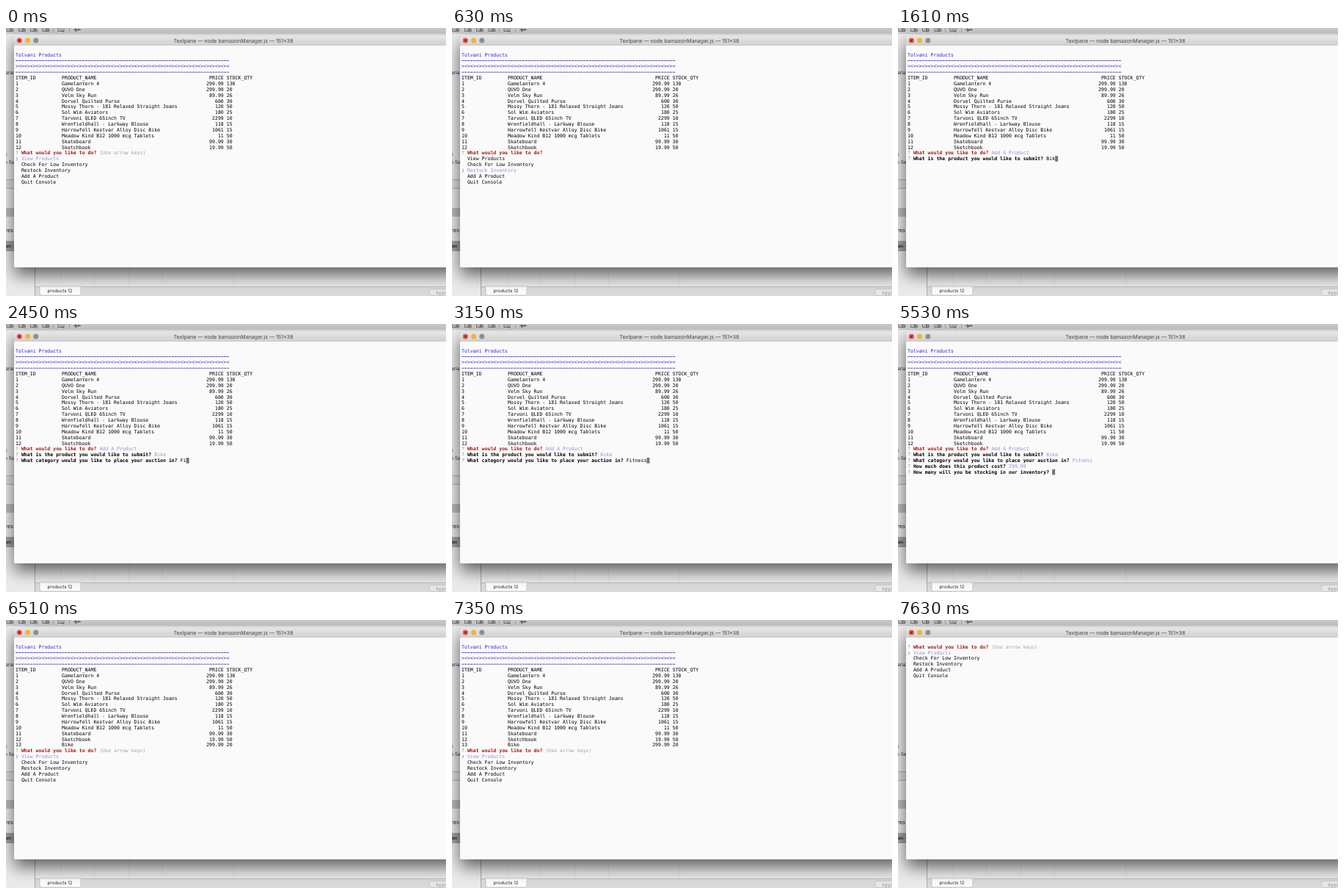
These frames come from a looping animation (600x365 px, 7.7 s). An HTML page:

```html
<!DOCTYPE html>
<html lang="en">
<head>
<meta charset="utf-8">
<title>Inventory console</title>
<style>
  html, body { margin: 0; width: 100%; height: 100%; overflow: hidden; background: #e6e6e6; }
  svg { display: block; width: 100vw; height: 100vh; }
  text { white-space: pre; text-rendering: geometricPrecision; }
  .ui { font-family: Inter, "Open Sans", sans-serif; font-size: 6.6px; fill: #222; }
  .ui .big { font-size: 7.5px; }
  .ui .tab { font-size: 6.2px; }
  .ui .off { fill: #999; }
  .ui .bold { font-size: 6px; font-weight: 700; }
  .title { font-size: 7.1px; fill: #444; }
  #screen { font-family: "DejaVu Sans Mono", "Liberation Mono", monospace; font-size: 6.55px; }
</style>
</head>
<body>
<svg viewBox="0 0 600 365" xmlns="http://www.w3.org/2000/svg">
  <defs>
    <linearGradient id="bar" x2="0" y2="1">
      <stop offset="0" stop-color="#e6e6e6"/><stop offset="1" stop-color="#d0d0d0"/>
    </linearGradient>
    <filter id="blur" x="-20%" y="-20%" width="140%" height="140%">
      <feGaussianBlur stdDeviation="11"/>
    </filter>
  </defs>

  <!-- application behind the window -->
  <rect width="600" height="365" fill="#eaeaea"/>
  <rect width="600" height="8" fill="#cacaca"/>
  <g id="tools" fill="none" stroke="#555" stroke-width=".8"></g>
  <rect y="207" width="11" height="11" fill="#dedede"/>
  <path d="M0 206.5H11M0 218.5H11" stroke="#b4b4b4"/>
  <rect y="245" width="11" height="12" fill="#bcbcbc"/>
  <rect y="290" width="11" height="14" fill="#a2a2a2"/>
  <path d="M75.5 326V350M120.5 326V350M167.5 326V350M213.5 326V350M310.5 326V350" stroke="#d6d6d6" stroke-width=".6"/>
  <rect x="40" y="352" width="560" height="13" fill="#dadada"/>
  <path d="M39.5 320V365" stroke="#a8a8a8"/>
  <path d="M40 352.5H600" stroke="#b4b4b4" stroke-width=".8"/>
  <path d="M45 352H103Q102 353 102 356V361Q102 364 99 364H49Q46 364 46 361V356Q46 353 45 352Z" fill="#fbfbfb" stroke="#b0b0b0" stroke-width=".6"/>
  <rect x="577.5" y="355.5" width="40" height="9" rx="2" fill="#e8e8e8" stroke="#bbb" stroke-width=".7"/>
  <rect x="11" y="21" width="616" height="315" opacity=".6" filter="url(#blur)"/>
  <g class="ui">
    <text x="-1" y="62.5">aria</text>
    <text x="-2" y="174">s</text>
    <text x="-2" y="185">n Se</text>
    <text class="big" x="-1" y="277.5">res</text>
    <text class="bold" x="-2" y="299.3">ion</text>
    <text class="tab" x="56.5" y="360.2">products 12</text>
    <text class="off" x="586" y="362.5">Apply</text>
  </g>

  <!-- window -->
  <path d="M11 325V14.5Q11 10.5 15 10.5H607V326H12Z" fill="#fafafa"/>
  <path d="M11 23.5V14.5Q11 10.5 15 10.5H607V23.5Z" fill="url(#bar)"/>
  <path d="M11 23.5H600" stroke="#bcbcbc" stroke-width=".6"/>
  <circle cx="18.3" cy="17" r="3.5" fill="#ee4f49"/>
  <path d="M16.8 15.5L19.8 18.5M19.8 15.5L16.8 18.5" stroke="#5c0a08" stroke-width=".9"/>
  <circle cx="29.6" cy="17" r="3.5" fill="#f2b632"/>
  <circle cx="40.8" cy="17" r="3.5" fill="#8f8f8f"/>
  <g class="ui">
    <text class="title" x="310" y="19.5" text-anchor="middle">Textpane — node bamazonManager.js — 151×38</text>
  </g>
  <g id="screen"></g>
</svg>
<script>
const LOOP = 7700, KEY = 140;
const X0 = 13, Y0 = 38.7, COL = 3.945, ROW = 7.865;
const INK = "#000", BLUE = "#2c22d4", RED = "#a01a1a", HINT = "#a0a0a0", PICK = "#958dda", MARK = "#7f8f7f";
const MENU = ["View Products", "Check For Low Inventory", "Restock Inventory", "Add A Product", "Quit Console"];
const GOODS = [
  ["Gamelantern 4", "299.99", 130],
  ["QUVO One", "299.99", 20],
  ["Velm Sky Run", "89.99", 26],
  ["Dorvel Quilted Purse", "600", 30],
  ["Mossy Thorn - 181 Relaxed Straight Jeans", "120", 50],
  ["Sol Wim Aviators", "180", 25],
  ["Tarvoni QLED 65inch TV", "2299", 10],
  ["Wrenfieldhall - Larkway Blouse", "118", 15],
  ["Harrowfell Kestvar Alloy Disc Bike", "1061", 15],
  ["Meadow Kind B12 1000 mcg Tablets", "11", 50],
  ["Skateboard", "99.99", 30],
  ["Sketchbook", "19.99", 50],
  ["Bike", "299.99", 20]
];
// ask: question appears, type: first key, done: answer is sent
const STEPS = [
  { ask: 1050, type: 1320, done: 2030, q: "What is the product you would like to submit?", a: "Bike" },
  { ask: 2030, type: 2240, done: 3430, q: "What category would you like to place your auction in?", a: "Fitness" },
  { ask: 3430, type: 4040, done: 5110, q: "How much does this product cost?", a: "299.99" },
  { ask: 5110, type: 5740, done: 6300, q: "How many will you be stocking in our inventory?", a: "20" }
];
const ADDED = 6300, CLEARED = 7625;
const BOLD = 'font-weight="700"';
const screen = document.getElementById("screen");

const colX = col => X0 + col * COL;
const rowY = row => Y0 + row * ROW;

function print(row, ...parts) {
  let col = 0, out = "";
  for (const [str, fill = INK, extra = ""] of parts) {
    const safe = str.replace(/</g, "&lt;").replace(/>/g, "&gt;");
    out += `<text x="${colX(col)}" y="${rowY(row)}" fill="${fill}" ${extra}>${safe}</text>`;
    col += str.length;
  }
  return out;
}

// a row of hyphens that almost touch
const rule = row =>
  `<path d="M${colX(0)} ${rowY(row) - 2.1}H${colX(74)}" stroke="${BLUE}" stroke-width=".8" stroke-dasharray="3.3 ${COL - 3.3}"/>`;

const tableRow = (row, id, name, price, qty) =>
  print(row, [String(id).padEnd(16) + name.padEnd(56 - price.length) + price + " " + qty]);

function table(count) {
  let out = print(0, ["Tolvani Products", BLUE]) + rule(1) +
    print(2, ["><".repeat(37), BLUE]) + rule(3) +
    tableRow(4, "ITEM_ID", "PRODUCT_NAME", "PRICE", "STOCK_QTY");
  GOODS.slice(0, count).forEach((g, i) => out += tableRow(5 + i, i + 1, ...g));
  return out;
}

const prompt = (row, q, color, answer, tint) =>
  print(row, ["? ", MARK], [q, color, BOLD], [" " + answer, tint]);

const doWhat = (row, answer, tint) => prompt(row, "What would you like to do?", RED, answer, tint);

function menu(row, picked) {
  let out = doWhat(row, picked ? "" : "(Use arrow keys)", HINT);
  MENU.forEach((item, i) => {
    const on = i === picked;
    out += print(row + 1 + i, [on ? "❯ " : "  ", PICK], [item, on ? PICK : INK]);
  });
  return out;
}

const cursor = (row, col) =>
  `<rect x="${colX(col)}" y="${rowY(row) - 6}" width="${COL}" height="7.6" fill="#777"/>`;

function form(t) {
  let out = doWhat(17, MENU[3], PICK);
  STEPS.forEach((s, i) => {
    if (t < s.ask) return;
    const row = 18 + i, sent = t >= s.done;
    const keys = Math.max(0, Math.floor((t - s.type) / KEY) + 1);
    const typed = sent ? s.a : s.a.slice(0, keys);
    out += prompt(row, s.q, INK, typed, sent ? PICK : INK);
    if (!sent) out += cursor(row, s.q.length + 3 + typed.length);
  });
  return out;
}

function scene(t) {
  if (t >= CLEARED) return menu(0, 0);
  if (t >= ADDED) return table(13) + menu(18, 0);
  if (t >= STEPS[0].ask) return table(12) + form(t);
  const picked = Math.min(3, Math.max(0, Math.floor((t - 420) / KEY) + 1));
  return table(12) + menu(17, picked);
}

// toolbar icons
let icons = "";
for (const x of [4, 20.5, 36.5, 53])
  icons += `<path d="M${x - 3} 0V4.5H${x + 2}V0M${x - 1} 2H${x + 1}"/><circle cx="${x + 4}" cy="3" r="2" fill="#999"/>`;
icons += '<path d="M64.5 0V6M86.5 0V6" stroke="#999"/><path d="M71 0V4.5H79V0M73 2H77M76 3L79 6"/>' +
  '<path d="M92 2.5H102M95 0V5L98 1.5M98 4L100 1" stroke-width="1"/>';
document.getElementById("tools").innerHTML = icons;

let shown = "";
function draw(now) {
  const next = scene(now % LOOP);
  if (next !== shown) screen.innerHTML = shown = next;
  requestAnimationFrame(draw);
}
draw(0);
</script>
</body>
</html>
```
